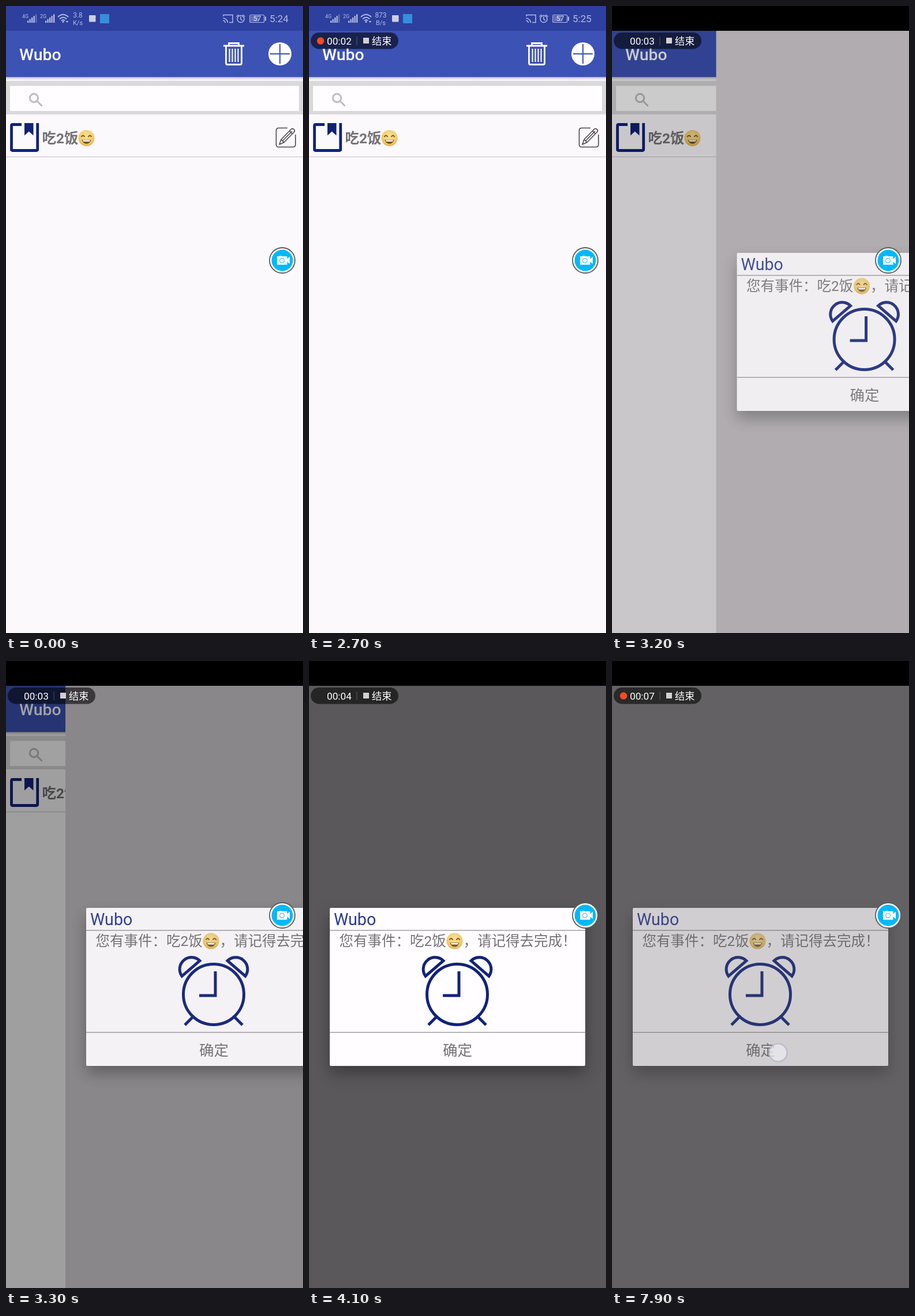
Recreate the animation shown at these times as an HTML page. Size 515 px wide and 1087 px high, loop 8 s.

```html
<!DOCTYPE html>
<html lang="zh-CN">
<head>
<meta charset="utf-8">
<title>Reminder</title>
<style>
  html, body { margin: 0; width: 100%; height: 100%; overflow: hidden; background: #fbf9fb; }
  svg { display: block; width: 100%; height: 100%; }
  text { font-family: Roboto, "Noto Sans CJK SC", "Noto Sans CJK", sans-serif; }
  .line { fill: none; stroke-linecap: butt; }
  .status { fill: #b4bce0; }
  .status text { font-size: 12px; }
  #card { filter: drop-shadow(0 13px 13px rgba(0, 0, 0, .32)); }
</style>
</head>
<body>
<svg viewBox="0 0 515 1087" preserveAspectRatio="none">
  <defs>
    <linearGradient id="barShade" x2="0" y2="1">
      <stop offset="0" stop-color="#aaaab8"/>
      <stop offset=".4" stop-color="#e6e4e9"/>
      <stop offset="1" stop-color="#fbf9fb"/>
    </linearGradient>
    <radialGradient id="skin" cx=".5" cy=".35" r=".7">
      <stop offset="0" stop-color="#fae09a"/>
      <stop offset=".7" stop-color="#f2c966"/>
      <stop offset="1" stop-color="#dcaa50"/>
    </radialGradient>
    <g id="smile">
      <circle r="14" fill="url(#skin)"/>
      <path class="line" d="M-9-2q3-5 6 0M3-2q3-5 6 0" stroke="#76562c" stroke-width="1.8" stroke-linecap="round"/>
      <path d="M-8 3H8Q6 10 0 10T-8 3Z" fill="#76562c"/>
      <path d="M-6.5 3.5H6.5L5.5 6H-5.5Z" fill="#fff"/>
    </g>
    <g id="bell">
      <path d="M202 546.3A20.5 20.5 0 0 1 233 519.7Z"/>
      <path d="M221 617L207 631"/>
    </g>
  </defs>

  <g id="page">
    <rect width="515" height="1087" fill="#fbf9fb"/>
    <rect width="515" height="43" fill="#2d3f9f"/>
    <rect y="43" width="515" height="80" fill="#3c52b5"/>
    <rect y="123" width="515" height="7" fill="url(#barShade)"/>

    <g class="status">
      <text x="28" y="21" style="font-size:9px">4G</text>
      <text x="59" y="21" style="font-size:9px">2G</text>
      <g id="bars"></g>
      <g class="line" stroke="#b4bce0" stroke-width="1.8">
        <path d="M90 19Q99 10.500 108 19M93 22.500Q99 17 105 22.500M96 25.500Q99 23 102 25.500"/>
      </g>
      <circle cx="99" cy="27.500" r="1.500"/>
      <path id="arrow" d="M103.500 26h5l-2.500 3Z"/>
      <g text-anchor="middle">
        <text id="speed" x="124.500" y="19.500">3.8</text>
        <text id="unit" x="124.500" y="32.500" style="font-size:11px">K/s</text>
      </g>
      <rect x="144" y="16" width="11.500" height="11.500" rx="1" fill="#cbcfe2"/>
      <rect x="163" y="14" width="16" height="16" fill="#348fdd"/>
      <g class="line" stroke="#b4bce0" stroke-width="1.5">
        <path d="M377 18V15.500H393V28.500H387M376.500 21q7 1 8 8M376.500 25q3 .5 4 4"/>
        <circle cx="407" cy="22.500" r="6"/>
        <path d="M407 18.500V23L410 25M399.500 18.500L403.500 15M414.500 18.500L410.500 15"/>
        <rect x="422.700" y="15.500" width="25" height="13" rx="2" stroke-width="1.200"/>
      </g>
      <rect x="424" y="17" width="14" height="10" opacity=".4"/>
      <rect x="449" y="18.500" width="2" height="7"/>
      <text x="435.500" y="26.200" text-anchor="middle" fill="#e3e6f5">57</text>
      <text id="time" x="457" y="28" style="font-size:17px">5:24</text>
    </g>

    <text x="23" y="94" font-size="28.400" font-weight="500" fill="#fff">Wubo</text>
    <g class="line" stroke="#fff" stroke-width="2.800">
      <path d="M377 69H413M386.500 69V64.500H403.500V69M381.500 69V99q0 2.500 2.500 2.500H406q2.500 0 2.500-2.500V69"/>
      <path d="M387.500 74V97M392.500 74V97M397.500 74V97M402.500 74V97" stroke-width="2.100"/>
    </g>
    <circle cx="475" cy="83" r="20" fill="#fff"/>
    <path class="line" d="M458 83H492M475 66V100" stroke="#3c52b5" stroke-width="2"/>

    <rect y="130" width="515" height="58" fill="#dad9da"/>
    <rect x="7" y="138.500" width="501" height="43.500" fill="#fffdff"/>
    <g class="line" stroke="#bdbbbd" stroke-width="2.900">
      <circle cx="48.500" cy="159.500" r="7.200"/>
      <path d="M53.500 164.500L62.500 173.500"/>
    </g>

    <path class="line" d="M27 205.500H11.500Q9.500 205.500 9.500 207.500V248.500Q9.500 250.500 11.500 250.500H52.500Q54.700 250.500 54.700 248.500V203" stroke="#10227c" stroke-width="4.800"/>
    <path d="M32 203H47.500V224.500L39.700 217.500L32 224.500Z" fill="#10227c"/>
    <text x="62.500" y="238" font-size="24.500" font-weight="700" fill="#757275">吃2饭</text>
    <use href="#smile" x="139.500" y="229"/>
    <g class="line" stroke="#4a484a" stroke-width="1.600" stroke-linejoin="round">
      <path d="M488 211.500H473q-4.500 0-4.500 4.500V240q0 4.500 4.500 4.500H497.500q4.500 0 4.500-4.500V223"/>
      <path d="M474 240L477 231.500L494.500 213.500Q497 211.500 499.500 214Q501.500 216.500 499.500 218.500L482 236.500ZM477 231.500L482 236.500M491.500 216.500L496.500 221.500M480 233.500L496 217"/>
    </g>
    <path d="M0 261.500H515" stroke="#d3d1d3" stroke-width="1.500"/>
  </g>

  <g id="overlay">
    <rect id="dim" y="43" width="515" height="1044"/>
    <rect id="window" y="43" width="515" height="1044"/>
    <rect width="515" height="43"/>
    <g id="dialog">
      <rect id="card" x="36" y="428" width="443" height="274" rx="2" fill="#fffdff"/>
      <text x="43" y="458" font-size="28.600" fill="#293a94">Wubo</text>
      <path d="M36 467H479M36 643.700H479" stroke="#a09ea0" stroke-width="1.500"/>
      <g font-size="24.500" fill="#757275">
        <text x="52.500" y="494">您有事件：吃2饭</text>
        <text x="267.500" y="494">，请记得去完成！</text>
      </g>
      <use href="#smile" x="252.500" y="485.500"/>
      <g class="line" stroke="#10227c" stroke-width="5">
        <circle cx="257" cy="578" r="52.500"/>
        <path d="M260 538V580H232"/>
        <use href="#bell"/>
        <use href="#bell" transform="translate(514) scale(-1 1)"/>
      </g>
      <text x="257.500" y="684" text-anchor="middle" font-size="25.500" font-weight="500" fill="#757275">确定</text>
    </g>
  </g>

  <circle id="touch" cx="288" cy="679" r="15.500" fill="#ebe9ef" fill-opacity=".75" stroke="#b9b7cc" stroke-width="2"/>

  <g>
    <circle cx="479" cy="441" r="22" fill="#fff" stroke="#5c5a5c" stroke-width="1.800"/>
    <circle cx="479" cy="441" r="18.500" fill="#00b9fb"/>
    <path d="M470 434H474V433H478V434H487.500V438.500L492 434.500V447L487.500 443.500V448.500H470Z" fill="#fff"/>
    <circle cx="478.500" cy="441.300" r="4" fill="none" stroke="#00b9fb" stroke-width="1"/>
  </g>

  <g id="pill">
    <rect x="3" y="46" width="152" height="28.500" rx="14.200" fill-opacity=".58"/>
    <circle id="dot" cx="20" cy="60.500" r="6.200" fill="#fa4a25"/>
    <g fill="#fff" font-size="17.200">
      <text id="timer" x="31" y="67">00:00</text>
      <text x="109" y="67">结束</text>
    </g>
    <path d="M83 53V68" stroke="#fff" stroke-opacity=".25"/>
    <rect x="94" y="55" width="10" height="10" fill="#d2d0d2"/>
  </g>
</svg>
<script>
  const LOOP = 8000, STEP = 100;
  const el = id => document.getElementById(id);
  const show = (id, on) => el(id).setAttribute('display', on ? 'inline' : 'none');
  const label = (id, text) => { if (el(id).textContent !== text) el(id).textContent = text; };
  const set = (id, name, value) => el(id).setAttribute(name, value);

  // Starts of each counted second, and when the record dot lights within it
  const ticks = [0, 1100, 2000, 3100, 4100, 5100, 6100, 7100];
  const lit = [[500, 1100], [1400, 2000], [2500, 3100], [3700, 4000],
               [4600, 5000], [5600, 6000], [6500, 7000], [7600, 8000]];

  el('bars').innerHTML = [37, 68].map(x => [0, 1, 2, 3, 4].map(i => {
    const h = 3.5 + i * 2.8;
    const faint = x === 37 && i === 4 ? .4 : 1;
    return `<rect x="${x + i * 3.5}" y="${29 - h}" width="2.3" height="${h}" opacity="${faint}"/>`;
  }).join('')).join('');

  const shade = dim => `rgb(${[251, 246, 250].map(c => Math.round(c * (1 - dim)))})`;

  function drawOverlay(t) {
    const open = t >= 3100;
    show('overlay', open);
    if (!open) return;
    const closing = t >= 7900;
    const beats = (t - 3200) / 100;
    const u = Math.min(1, (t - 2955) / 831);
    const left = t >= 3700 ? 0 : 515 * (1 - u) ** 3;
    const dim = closing ? .605 : Math.min(.642, .3 + .15 * beats);
    set('dim', 'fill-opacity', Math.min(.642, .2 + .165 * beats));
    set('window', 'x', left);
    set('window', 'fill', shade(dim));
    set('dialog', 'transform', `translate(${left})`);
    set('dialog', 'opacity', closing ? .7 : Math.min(1, .82 + .09 * beats));
  }

  function draw(t) {
    drawOverlay(t);
    show('pill', t >= 100);
    set('pill', 'opacity', t < 200 ? .5 : 1);
    show('dot', lit.some(([from, to]) => t >= from && t < to));
    label('timer', '00:0' + (ticks.filter(s => t >= s).length - 1));
    label('speed', t < 1400 ? '3.8' : '873');
    label('unit', t < 1400 ? 'K/s' : 'B/s');
    label('time', t < 2700 ? '5:24' : '5:25');
    show('arrow', t < 800 || t >= 1100);
    show('touch', t >= 7700);
  }

  const start = performance.now();
  function frame() {
    const t = (performance.now() - start) % LOOP;
    draw(Math.floor(t / STEP) * STEP);
    requestAnimationFrame(frame);
  }
  frame();
</script>
</body>
</html>
```
